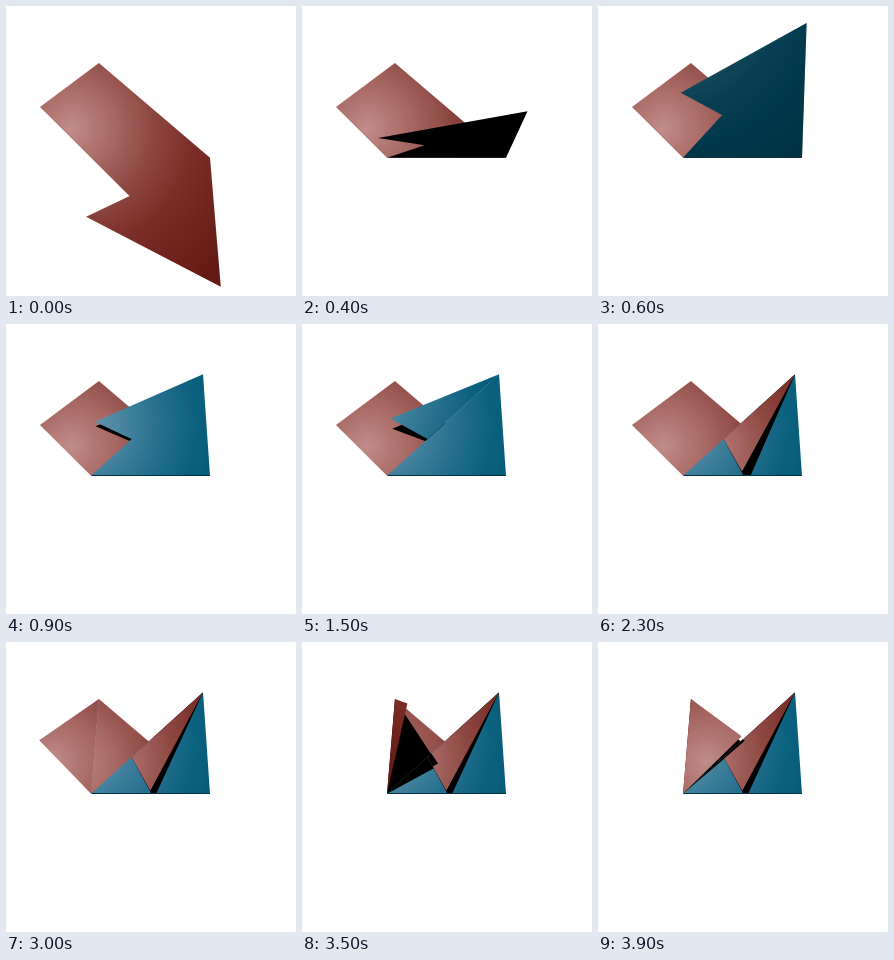
Recreate the animation shown at these times as an HTML page with a canvas. Size 290 px wide and 290 px high, loop 5400 ms.

```html
<!DOCTYPE html>
<html lang="en">
<head>
<meta charset="utf-8">
<title>Paper folding</title>
<style>
  html, body { margin: 0; width: 100%; height: 100%; overflow: hidden; background: #fff; }
  canvas { display: block; width: 290px; height: 290px; }
</style>
</head>
<body>
<canvas id="stage" width="290" height="290"></canvas>
<script>
const ctx = document.getElementById('stage').getContext('2d');
const LOOP = 5400, STEP = 100;
const TILT = 0.588, DISTANCE = 470;
const LIGHT = [-69, -98, 120];
const VIEW = [-0.1, 0.45, 0.887];

// Sheet coordinates: the first crease is the line v = 0.
const BASE = [[-1, -2], [1, 0], [-1, 0]];
const SIDE = [[-1, -2], [-2, -1], [-1, 0]];
const FLAP = [[-1, 0], [1, 0], [1, 2]];
const EAR = [[-1, 1], [1, 2], [-1 / 3, 2 / 3]];

const RED = ['#c08c89', '#a96a65', '#8e4842', '#7b2f28', '#6f231c', '#641a13'];
const BLUE = ['#709cb1', '#5089a3', '#2a7391', '#0c617f', '#005873', '#00506a'];

const { sin, cos, PI, min, max, hypot } = Math;
const rad = deg => deg * PI / 180;
const dot = (a, b) => a[0] * b[0] + a[1] * b[1] + a[2] * b[2];
const sub = (a, b) => a.map((n, i) => n - b[i]);
const along = (a, b, k) => a.map((n, i) => n + b[i] * k);

// Eased fold angle that advances once per step.
function foldAngle(t, start, steps, degrees, bias = 1) {
  const k = min(steps, max(0, Math.floor((t - start) / STEP) + 1));
  return rad(degrees) * (1 - cos(PI * (k / steps) ** bias)) / 2;
}

const scale = ([x, v, h = 0]) => [x * 59.5, v * 65, h * 65];

function foldUp([x, v, h = 0], a) {
  return [x, v * cos(a) - h * sin(a), v * sin(a) + h * cos(a)];
}

function project([x, v, h]) {
  const y = v * cos(TILT) - h * sin(TILT);
  const z = v * sin(TILT) + h * cos(TILT);
  const s = 1 / (1 - z / DISTANCE);
  return [144.5 + x * s, 145 + (6.7 + y) * s];
}

function area(p) {
  return p.reduce((sum, [x, y], i) => {
    const [nx, ny] = p[(i + 1) % p.length];
    return sum + x * ny - nx * y;
  }, 0);
}

function normal([a, b, c]) {
  const u = sub(b, a), w = sub(c, a);
  const n = [u[1] * w[2] - u[2] * w[1], u[2] * w[0] - u[0] * w[2], u[0] * w[1] - u[1] * w[0]];
  return n.map(q => q / hypot(...n));
}

// One path for all parts, wound alike so that no seam shows between them.
function outline(parts) {
  ctx.beginPath();
  for (const part of parts) {
    const p = part.map(project);
    if (area(p) < 0) p.reverse();
    p.forEach(([x, y], i) => i ? ctx.lineTo(x, y) : ctx.moveTo(x, y));
    ctx.closePath();
  }
}

function paint(parts, fill) {
  outline(parts);
  ctx.fillStyle = fill;
  ctx.fill();
}

// Gradient around the point where the face mirrors the light to the viewer.
function gloss(face, n, colors) {
  const facing = max(0.05, dot(n, VIEW));
  const mirror = sub(n.map(q => 2 * facing * q), VIEW);
  const spot = along(LIGHT, mirror, -dot(n, sub(LIGHT, face[0])) / facing);
  const [x, y] = project(spot);
  const g = ctx.createRadialGradient(x, y, 0, x, y, 200);
  colors.forEach((color, i) => g.addColorStop(i / (colors.length - 1), color));
  return g;
}

// Draws coplanar parts; the first one sets orientation and light.
function drawFace(parts, flat, back) {
  const face = parts[0];
  const facing = area(face.map(project)) < 0 ? -1 : 1;
  const n = normal(face).map(q => q * facing);
  const middle = [0, 1, 2].map(i => (face[0][i] + face[1][i] + face[2][i]) / 3);
  const ray = sub(LIGHT, middle);
  const lit = dot(n, ray) / hypot(...ray);
  if (lit <= 0) return paint(parts, '#000');
  const turned = facing !== Math.sign(area(flat));
  paint(parts, gloss(face, n, turned ? back : RED));
  if (lit < 0.4) paint(parts, `rgba(0,0,0,${0.4 - lit})`);
}

// Projects a face from the light onto the plane of another one.
function castShadow(face, parts) {
  let n = normal(parts[0]);
  const origin = parts[0][0];
  if (dot(n, sub(LIGHT, origin)) < 0) n = n.map(q => -q);
  const height = p => dot(n, sub(p, origin));
  const fallen = face.map(p => {
    const h = max(0, height(p));
    return along(p, sub(p, LIGHT), h / max(4, height(LIGHT) - h));
  });
  ctx.save();
  outline(parts);
  ctx.clip();
  paint([fallen], '#000');
  ctx.restore();
}

function draw(t) {
  const a1 = foldAngle(t, 100, 9, 175);
  const a2 = foldAngle(t, 1500, 10, 173, 0.85);
  const a3 = foldAngle(t, 3000, 10, 170);

  const earTip = [-0.5 - 0.5 * cos(a2), 0.5 + 0.5 * cos(a2), -Math.SQRT1_2 * sin(a2)];
  const base = BASE.map(scale);
  const side = [SIDE[0], [-1 - cos(a3), -1, sin(a3)], SIDE[2]].map(scale);
  const flap = FLAP.map(p => scale(foldUp(p, a1)));
  const ear = [earTip, EAR[1], EAR[2]].map(p => scale(foldUp(p, a1)));

  const ground = a3 ? [base] : [base, side];
  const cover = a2 ? [flap] : [flap, ear];

  ctx.fillStyle = '#fff';
  ctx.fillRect(0, 0, 290, 290);

  drawFace(a1 ? ground : [...ground, ...cover], BASE, RED);
  if (!a1) return;

  if (a1 > rad(130)) {
    castShadow(flap, ground);
    castShadow(ear, ground);
  }
  if (a3) castShadow(side, ground);

  drawFace(cover, FLAP, BLUE);
  if (a2) {
    castShadow(ear, cover);
    if (a3) castShadow(side, cover);
    drawFace([ear], EAR, BLUE);
  }
  if (a3) {
    castShadow(side, [ear]);
    drawFace([side], SIDE, RED);
  }

  if (a1 > rad(130)) {
    ctx.fillStyle = '#06303f';
    ctx.fillRect(86, 151, 118, 1);
  }
}

const begin = performance.now();
function tick() {
  draw((performance.now() - begin) % LOOP);
  requestAnimationFrame(tick);
}
tick();
</script>
</body>
</html>
```
